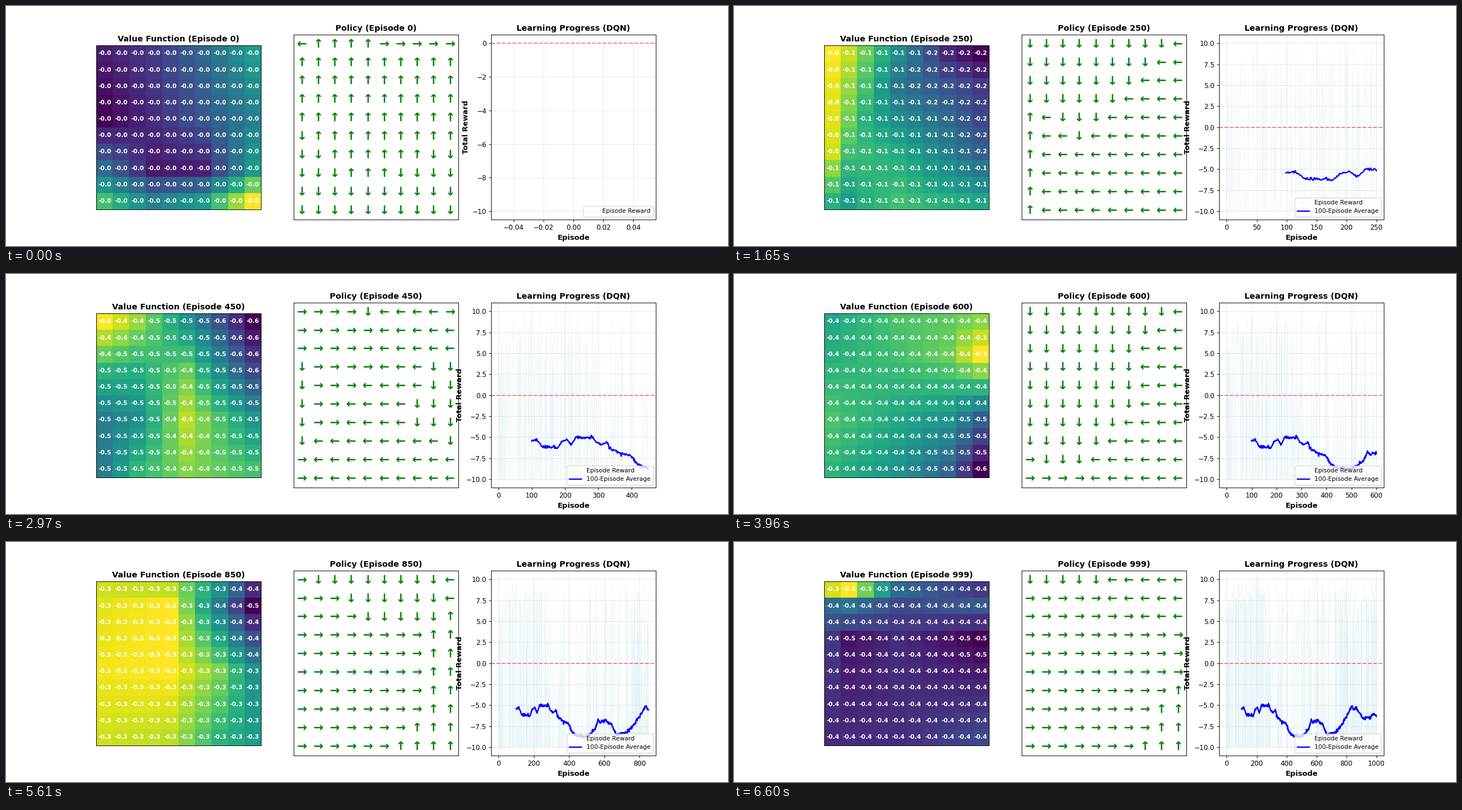
Recreate the animation shown at these times as a matplotlib script. Size 1280 by 427 pixels, loop 6.93 s.

```python
import numpy as np
import matplotlib.pyplot as plt
from matplotlib.animation import FuncAnimation

DPI = 256 / 3
W, H = 1280, 427
N = 10
STEP_MS = 330
EPISODES = [*range(0, 1000, 50), 999]
ARROWS = {"U": "↑", "D": "↓", "L": "←", "R": "→"}


def surface(low, high, rows, cols, *knots):
    """Bilinear 10x10 surface through a few knots, scaled to low..high."""
    cells = np.arange(N)
    wide = np.array([np.interp(cells, cols, k) for k in knots])
    full = np.array([np.interp(cells, rows, wide[:, c]) for c in cells]).T
    full = (full - full.min()) / (full.max() - full.min())
    return low + (high - low) * full


value_0 = surface(-0.045, -0.002, (0, 4, 7, 9), (0, 3, 6, 9),
                  (.08, .17, .33, .55), (.00, .13, .27, .43),
                  (.35, .07, .09, .54), (.70, .43, .55, 1.0))
value_150 = surface(-0.0455, 0.068, (0, 2, 4, 6, 9), (0, 2, 4, 7, 9),
                    (1.0, .95, .88, .55, .75), (.75, .65, .41, .76, .93),
                    (.58, .37, .60, .74, .72), (.15, .42, .63, .65, .65),
                    (.00, .40, .55, .60, .62))
value_350 = surface(-0.465, -0.07, (0, 4, 6, 9), (0, 1, 4, 9),
                    (.82, .75, .40, .00), (.90, .78, .48, .20),
                    (1.0, .76, .58, .30), (.78, .65, .68, .56))
value_450 = surface(-0.61, -0.397, (0, 3, 6, 9), (0, 2, 5, 9),
                    (1.0, .85, .52, .00), (.65, .62, .77, .22),
                    (.42, .50, .90, .53), (.42, .65, .82, .70))
value_600 = surface(-0.556, -0.33, (0, 2, 6, 9), (0, 4, 7, 9),
                    (.60, .72, .75, .83), (.63, .70, .78, 1.0),
                    (.72, .60, .52, .30), (.65, .52, .33, .00))
value_850 = surface(-0.452, -0.252, (0, 1, 5, 9), (0, 4, 7, 9),
                    (.90, .88, .50, .12), (.93, .97, .40, .00),
                    (.95, .97, .78, .50), (.90, .87, .63, .54))
value_999 = surface(-0.462, -0.252, (0, 1, 3, 9), (0, 1, 4, 9),
                    (.93, 1.0, .35, .17), (.35, .38, .22, .28),
                    (.16, .05, .13, .00), (.12, .13, .13, .22))


# Policies: the direction chosen at row r, column c
def policy_0(r, c):
    if r == 0 and (c == 0 or c > 4):
        return "R" if c else "L"
    return "D" if c < r - 4 or c > 19 - 2 * r else "U"


def policy_150(r, c):
    if c < 7 - r - (r in (2, 3)):
        return "D"
    return "U" if c == 0 and r > 6 else "L"


def policy_350(r, c):
    if r < 4:
        return "D"
    if c == 0:
        return "U"
    if c <= min(r - 3, 5):
        return "L"
    return "R" if r > 7 or (r == 7 and c < 8) else "D"


def policy_450(r, c):
    if r == 0 and c in (4, 9):
        return "D" if c == 4 else "R"
    if 3 <= r <= 7 and (c == 0 or c >= (8, 8, 7, 7, 9)[r - 3]):
        return "D"
    return "R" if c < (5, 5, 5, 5, 4, 3, 3, 1, 1, 1)[r] else "L"


def policy_600(r, c):
    if (r == 8 and c == 0) or (r == 9 and c < 4):
        return "R"
    return "D" if c < min(9 - r + max(r - 2, 0), 12 - r, 7 + 2 * (r < 2)) \
        else "L"


def policy_850(r, c):
    if c < (1, 3, 4, 8, 8, 8, 8, 8, 7, 6)[r]:
        return "R"
    if r < 3 and c < 9:
        return "D"
    return "L" if r < 2 else "U"


def policy_999(r, c):
    if c < (5, 5, 7, 10, 10, 10, 9, 8, 8, 7)[r]:
        return "R" if r else "D"
    return "L" if r < 3 else "U"


KEYS = {0: (value_0, policy_0), 3: (value_150, policy_150),
        7: (value_350, policy_350), 9: (value_450, policy_450),
        12: (value_600, policy_600), 17: (value_850, policy_850),
        20: (value_999, policy_999)}

# running average, one bend every 15 episodes from 99 on
BENDS = [-5.4, -5.3, -6.1, -6.2, -6.1, -6.3, -5.6, -5.3, -5.9, -4.9,
         -5.2, -5.1, -4.9, -5.6, -5.9, -5.6, -6.5, -6.7, -7.0, -7.0,
         -7.3, -8.0, -8.5, -8.7, -8.6, -8.7, -8.8, -8.7, -8.5, -8.1,
         -7.8, -6.8, -7.1, -6.9, -6.8, -7.1, -7.2, -7.9, -8.5, -8.5,
         -8.4, -8.3, -8.2, -7.8, -7.5, -7.1, -6.6, -6.2, -5.7, -5.1,
         -5.5, -5.3, -5.7, -6.0, -6.5, -6.6, -6.4, -6.6, -6.2, -6.0, -6.3]

rng = np.random.default_rng(4)
episodes = np.arange(1000)
average = np.interp(episodes, np.arange(99, 1000, 15), BENDS)
average += np.repeat(rng.normal(0, 0.09, 500), 2)
odds = (np.interp(episodes + 50, episodes, average) + 10) / 16
wins = rng.random(1000) < odds
rewards = np.where(wins, 10 - rng.gamma(1.6, 2.5, 1000), -10).clip(-10, 10)
rewards[0] = -10


def state(i):
    """Values and policy at step i, sweeping between the known ones."""
    a = max(s for s in KEYS if s <= i)
    b = min(s for s in KEYS if s >= i)
    t = (i - a) / (b - a) if b > a else 0
    values = (1 - t) * KEYS[a][0] + t * KEYS[b][0]
    moves = [[KEYS[b if (r + c + 1) / (2 * N) < t else a][1](r, c)
              for c in range(N)] for r in range(N)]
    return values, moves


def bold_title(ax, text):
    ax.set_title(text, fontsize=12, fontweight="bold")


def cell_texts(ax, size, color):
    return [[ax.text(c, r, "", ha="center", va="center", fontsize=size,
                     color=color, fontweight="bold")
             for c in range(N)] for r in range(N)]


fig, (ax_val, ax_pol, ax_rew) = plt.subplots(
    1, 3, figsize=(W / DPI, H / DPI), dpi=DPI)
fig.subplots_adjust(left=0.125, right=0.9, bottom=0.11, top=0.88, wspace=0.2)

image = ax_val.imshow(np.zeros((N, N)), cmap="viridis")
ax_pol.set(xlim=(-0.5, N - 0.5), ylim=(N - 0.5, -0.5))
for ax in (ax_val, ax_pol):
    ax.set(xticks=[], yticks=[])
numbers = cell_texts(ax_val, 9, "white")
arrows = cell_texts(ax_pol, 18, "green")


def draw_rewards(last):
    ax = ax_rew
    ax.clear()
    ax.plot(episodes[:last + 1], rewards[:last + 1], color="lightblue",
            alpha=0.3, lw=0.5, label="Episode Reward")
    if last >= 99:
        ax.plot(episodes[99:last + 1], average[99:last + 1], color="blue",
                lw=2, label="100-Episode Average")
    ax.axhline(0, color="red", ls="--", alpha=0.5)
    if last:
        ax.set_ylim(-11, 11)
    ax.set_xlabel("Episode", fontsize=11, fontweight="bold")
    ax.set_ylabel("Total Reward", fontsize=11, fontweight="bold")
    bold_title(ax, "Learning Progress (DQN)")
    ax.legend(loc="lower right", fontsize=9)
    ax.grid(True, alpha=0.3)


def update(i):
    values, moves = state(i)
    image.set_data(values)
    image.set_clim(values.min(), values.max())
    for r in range(N):
        for c in range(N):
            numbers[r][c].set_text(f"{values[r, c]:.1f}")
            arrows[r][c].set_text(ARROWS[moves[r][c]])
    bold_title(ax_val, f"Value Function (Episode {EPISODES[i]})")
    bold_title(ax_pol, f"Policy (Episode {EPISODES[i]})")
    draw_rewards(EPISODES[i])
    return []


anim = FuncAnimation(fig, update, frames=len(EPISODES), interval=STEP_MS,
                     repeat=True, repeat_delay=0, blit=False)
plt.show()
```
